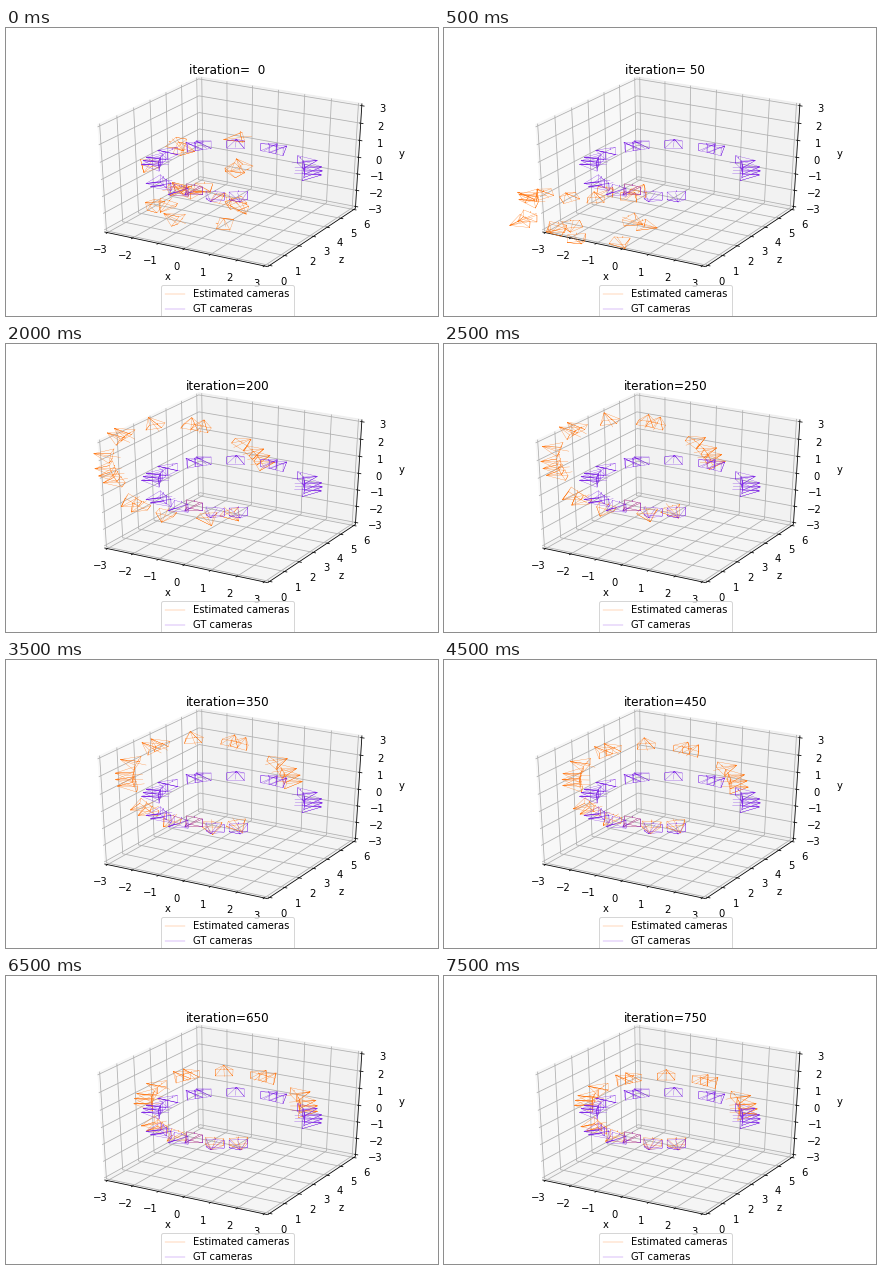
Animation of 432 by 288 pixels, one loop 8000 ms. Source, as a matplotlib script:

```python
import numpy as np
import matplotlib.pyplot as plt
from matplotlib.animation import FuncAnimation
from matplotlib.lines import Line2D
from matplotlib.patches import Polygon

W, H, DPI = 432, 288, 72
ORANGE, PURPLE = "#FF7D1E", "#812CE5"
STEPS, INTERVAL = 16, 500

# Plot area in pixels and the perspective view (elev 30, azim -60)
LEFT, BOTTOM, PW, PH = 0.125 * W, 0.125 * H, 0.775 * W, 0.755 * H
EL, AZ, DIST = np.radians(30), np.radians(-60), 10
EYE = np.array([np.cos(EL) * np.cos(AZ), np.cos(EL) * np.sin(AZ), np.sin(EL)])
RIGHT = np.array([-np.sin(AZ), np.cos(AZ), 0])
UP = np.cross(EYE, RIGHT)
MID = np.array([0.0, 3.0, 0.0])
VERTICAL = np.array([0.0, 0.0, 1.0])


def project(p):
    """Map (x, z, y) points to stage pixels."""
    q = (np.asarray(p, float) - MID) / 6
    depth = DIST - q @ EYE
    u, v = q @ RIGHT / depth, q @ UP / depth
    return (LEFT + PW * (u + 0.095) / 0.185,
            BOTTOM + PH * (v + 0.095) / 0.185)


def rotation(vec):
    """Rotation matrix of a rotation vector (radians)."""
    angle = np.linalg.norm(vec)
    if angle < 1e-9:
        return np.eye(3)
    x, y, z = np.asarray(vec) / angle
    k = np.array([[0, -z, y], [z, 0, -x], [-y, x, 0]])
    return np.eye(3) + np.sin(angle) * k + (1 - np.cos(angle)) * k @ k


def wireframe(scale=0.3):
    a, b, c, d = (np.array([x, y, 2])
                  for y in (0.75, -0.75) for x in (-1, 1))
    up1, up2 = np.array([0, 0.75, 2]), np.array([0, 1, 2])
    o, f = np.zeros(3), np.array([0, 0, 3])
    return scale * np.array([a, up1, up2, up1, b, d, c, a, o, b, d, o, c, o, f])


def ring_pose(deg, height):
    """Camera on the ring, looking level at its centre."""
    t = np.radians(deg)
    out = np.array([np.cos(t), np.sin(t), 0])
    axes = np.column_stack([np.cross(-out, VERTICAL), VERTICAL, -out])
    return axes, MID + 3 * out + height * VERTICAL


def ring():
    """Small groups of cameras along one slowly rising turn."""
    groups = [(-126, 2), (-103, 1), (-73, 1), (-55, 1), (27, 3), (47, 1),
              (85, 2), (117, 1), (148, 2), (177, 1), (201, 3)]
    for mid, count in groups:
        for k in range(count):
            deg = mid + 7.5 * (k - (count - 1) / 2)
            yield ring_pose(deg, -0.1 + 0.0014 * deg)


WIRE = wireframe()
ANCHOR = ring_pose(-90, 0)
ORIGIN = ANCHOR[1]
CAMERAS = list(ring())

rng = np.random.default_rng(4)
N = len(CAMERAS)
TWISTS = rng.normal(0, 0.6, (N, 3))
SCATTER = (ORIGIN + np.outer(rng.uniform(-1.4, 1.9, N), RIGHT)
           + np.outer(rng.normal(0.5, 1.1, N), VERTICAL))


def estimate(t):
    """Estimated poses at t seconds: scatter, then a turned ring settling."""
    mess = np.exp(-t / 0.4)
    yaw = np.radians(80) * np.exp(-t / 2.3)
    tilt = np.radians(57) * np.exp(-t / 4.5) * (1 - np.exp(-(t / 1.4) ** 2))
    scale = 1 + 0.2 * np.exp(-t / 2.3)
    sink = 6 * np.exp(-t / 0.95)
    turn = rotation(yaw * VERTICAL) @ rotation(tilt * RIGHT)
    yield ANCHOR
    for (axes, pos), start, twist in zip(CAMERAS, SCATTER, TWISTS):
        rot = turn @ axes @ rotation(mess * twist)
        goal = ORIGIN + scale * turn @ (pos - ORIGIN) - sink * VERTICAL
        yield rot, goal + mess * (start - 0.4 * rot[:, 2] - goal)


def outline(pose):
    axes, pos = pose
    return project(WIRE @ axes.T + pos)


fig = plt.figure(figsize=(W / DPI, H / DPI), dpi=DPI, facecolor="white")
ax = fig.add_axes([0, 0, 1, 1])
ax.set(xlim=(0, W), ylim=(0, H))
ax.axis("off")

LO, HI = MID - 3.125, MID + 3.125


def line(points, **style):
    ax.plot(*project(points), lw=0.8, zorder=1, solid_capstyle="butt", **style)


def label(point, text, va):
    x, y = project(point)
    ax.text(x, y, text, ha="center", va=va, fontsize=10, zorder=1.5)


def pane(axis, value, shade):
    i, j = [k for k in range(3) if k != axis]
    corners = np.full((4, 3), value)
    corners[:, i] = [LO[i], HI[i], HI[i], LO[i]]
    corners[:, j] = [LO[j], LO[j], HI[j], HI[j]]
    ax.add_patch(Polygon(np.column_stack(project(corners)), closed=False,
                         fc=(shade,) * 3, ec=(shade,) * 3, lw=1, alpha=0.5,
                         zorder=0))


def draw_axis(axis, name, path, tick_dir):
    """path: corners each grid line visits, starting on the axis line."""
    def at(point, value):
        p = np.array(point, float)
        p[axis] = value
        return p

    edge = at(path[0], MID[axis])
    away = np.sign(edge - MID)
    out = away * np.eye(3)[tick_dir]
    line([at(edge, LO[axis]), at(edge, HI[axis])], color="black")
    values = np.arange(-3, 4) + int(MID[axis])
    for v in values:
        line([at(p, v) for p in path], color="#b0b0b0")
    for v in values:
        p = at(edge, v)
        line([p - 0.05 * out, p + 0.1 * out], color="black")
        label(p + 0.5 * away, str(v).replace("-", "\u2212"), "top")
    label(edge + 1.0865 * away, name, "center")


pane(0, LO[0], 0.95)
pane(1, HI[1], 0.90)
pane(2, LO[2], 0.925)

(x0, z0, y0), (x1, z1, y1) = LO, HI
draw_axis(0, "x", [(0, z0, y0), (0, z1, y0), (0, z1, y1)], 1)
draw_axis(1, "z", [(x1, 0, y0), (x0, 0, y0), (x0, 0, y1)], 0)
draw_axis(2, "y", [(x1, z1, 0), (x0, z1, 0), (x0, z0, 0)], 0)

guesses = []
for pose in [ANCHOR, *CAMERAS]:
    guesses += ax.plot([], [], color=ORANGE, lw=0.3, zorder=2)
    ax.plot(*outline(pose), color=PURPLE, lw=0.3, zorder=2.5)

ax.legend([Line2D([], [], color=c, lw=0.3) for c in (ORANGE, PURPLE)],
          ["Estimated cameras", "GT cameras"], loc="upper center",
          bbox_to_anchor=(LEFT + PW / 2, BOTTOM), bbox_transform=ax.transData,
          fontsize=10)
title = ax.text(LEFT + PW / 2, BOTTOM + 0.92 * PH + 6, "", fontsize=12,
                ha="center", va="baseline")


def update(i):
    title.set_text(f"iteration={50 * i:3d}")
    for artist, pose in zip(guesses, estimate(i * INTERVAL / 1000)):
        artist.set_data(*outline(pose))
    return [title, *guesses]


anim = FuncAnimation(fig, update, frames=STEPS, interval=INTERVAL,
                     repeat=True, repeat_delay=0, blit=False)
plt.show()
```
